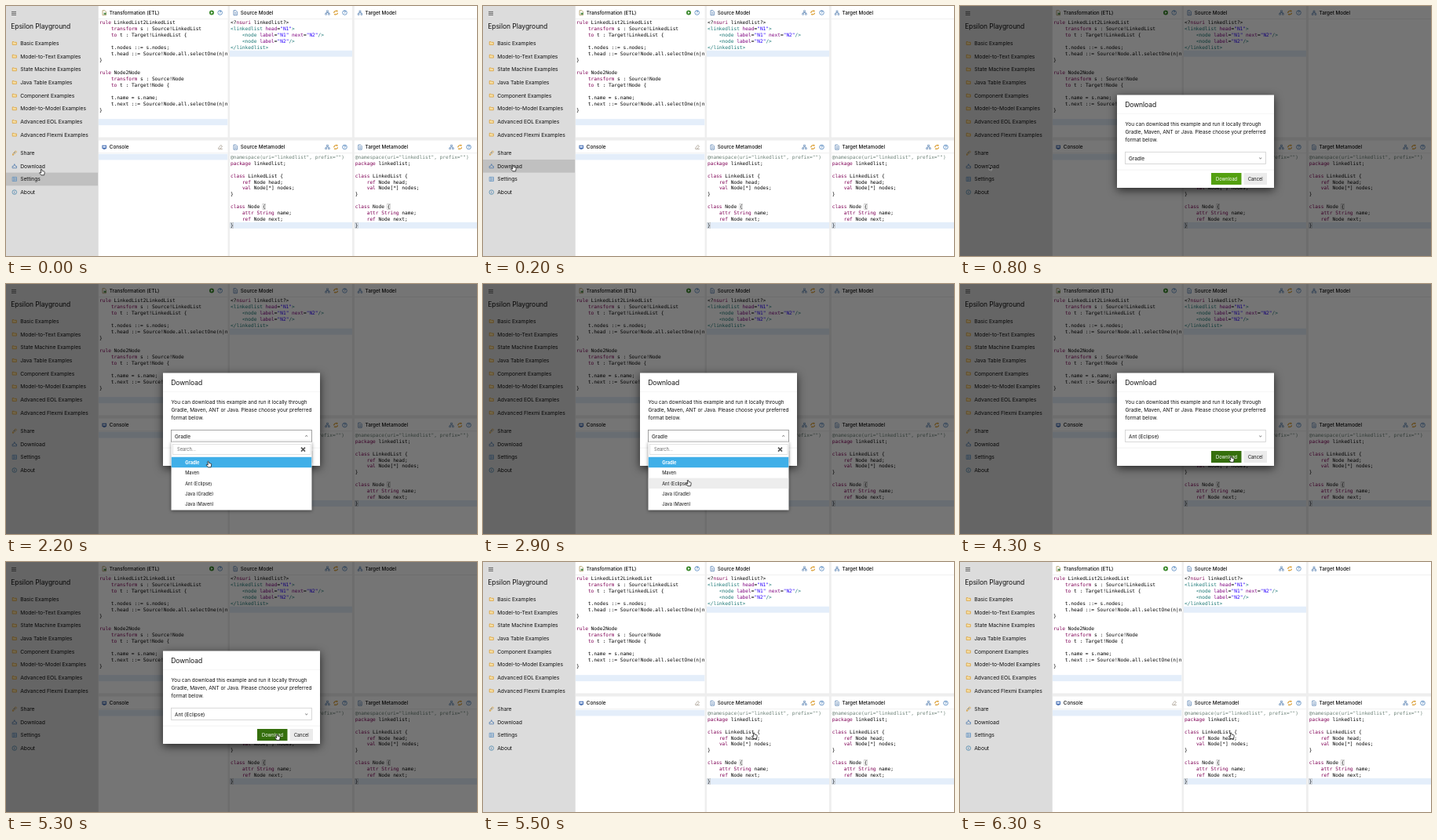
Recreate the animation shown at these times as an HTML page. Size 600 by 319 pixels, loop 6400 ms.

```html
<!DOCTYPE html>
<html lang="en">
<head>
<meta charset="utf-8">
<title>Playground download</title>
<style>
  html, body { margin: 0; width: 100%; height: 100%; overflow: hidden; background: #dcdcdc; }
  svg { display: block; width: 100%; height: 100%; }
  text { font: 6.5px Inter, sans-serif; letter-spacing: -.04px; fill: #111; white-space: pre; }
  .code { font: 6.18px "DejaVu Sans Mono", monospace; letter-spacing: 0; fill: #000; }
  .title { font-size: 8.5px; }
  .item { font-size: 6.75px; }
  .head { font-size: 6.35px; font-weight: 500; }
  .small { font-size: 5.7px; letter-spacing: 0; }
  .key { fill: #7f0055; } .str { fill: #2a00ff; } .tag { fill: #197674; }
  .attr { fill: #7f007f; } .note { fill: #6b8076; }
  .line { fill: none; stroke-width: .7; }
</style>
</head>
<body>
<svg id="stage" viewBox="0 0 600 319"></svg>
<script>
const BLUE = '#3f6fa8', GOLD = '#d99a2b', PITCH = 7.95, CHAR = 3.72;

const rect = (x, y, w, h, fill, more = '') =>
  `<rect x="${x}" y="${y}" width="${w}" height="${h}" fill="${fill}" ${more}/>`;
const text = (x, y, s, cls = '', more = '') => `<text x="${x}" y="${y}" class="${cls}" ${more}>${s}</text>`;
const at = (x, y, body) => `<g transform="translate(${x} ${y})">${body}</g>`;
const stroke = (d, color, more = '') => `<path class="line" d="${d}" stroke="${color}" ${more}/>`;

// Icons are centred on 0,0
const icons = {
  folder: stroke('M-2.6-1.9h1.9l.7.7h2.6v3.1h-5.2z', GOLD, 'style="fill:#f6dfa4"'),
  pen: stroke('M-2.5 2.5l.8-2.3L1.5-2.8 2.8-1.5-.4 1.7zM-1 2.6h-1.5', GOLD) + stroke('M-1 .6L1-1.4', BLUE),
  download: stroke('M-2.7 2.5v-2.3h1.5L0-2.6 1.2.2h1.5v2.3z', BLUE),
  settings: stroke('M-2.7-2.6h5.4v5.2h-5.4zM-.9-2.6v5.2M-.9-.8h3.6M-.9 1h3.6', '#5b8fc0'),
  about: '<circle class="line" r="2.8" stroke="#3b7fa8"/>' + stroke('M0-.4v2M0-1.7v.7', BLUE),
  help: '<circle class="line" r="2.8" stroke="#3672b4"/>' +
    text(0, 1.75, '?', '', 'text-anchor="middle" style="font-size:4.8px;font-weight:600;fill:#3672b4"'),
  run: '<circle r="3" fill="#3c8a2e"/><path d="M-.9-1.6L1.7 0-.9 1.6z" fill="#fff"/>',
  tree: stroke('M-1-2.7h2v1.7h-2zM-2.8 1h1.8v1.7h-1.8zM1 1h1.8v1.7H1zM0-1V0M-1.9 1V0h3.8v1', BLUE, 'style="stroke-width:.55"'),
  swap: stroke('M-2.7.6V-.5L-1-2.2h2M1.9.2V1L.6 2.3h-2', GOLD, 'style="stroke-width:1.1"') +
    '<path d="M.5-3.4l2 1.3-2 1.4zM-1 .9v2.6l-1.9-1.2z" fill="#d99a2b"/>',
  file: stroke('M-2.2-3h2.9l1.5 1.5V3h-4.4zM-.9-.5H1M-.9 1.2H1', BLUE),
  rule: stroke('M-2.2-3h2.9l1.5 1.5V3h-4.4z', '#a18a4a') + rect(-.6, 0, 3, 2.2, '#4c8b4a'),
  console: rect(-2.8, -2.5, 5.6, 4.2, '#3d67ae') + rect(-1.9, -1.5, 3.8, 2, '#dfe9f8') + rect(-1.5, 2, 3, .8, '#3d67ae'),
  eraser: stroke('M-2.4 1.3L.7-2.5 2.5-1-.6 2.5h-1.6zM-.5 2.5h3.3', '#9a8d7d')
};
const icon = (name, x, y) => at(x, y, icons[name]);

const TOKEN = /("[^"]*")|(&lt;\/?\w+|(?<!\?)\/?&gt;)|(\w+(?==))|\b(rule|transform|to|package|class|ref|val|attr|String|nsuri)\b/g;
function paint(line) {
  if (line[0] === '@') return `<tspan class="note">${line}</tspan>`;
  return line.replace(/</g, '&lt;').replace(/>/g, '&gt;').replace(TOKEN, (m, str, tag, attr) =>
    `<tspan class="${str ? 'str' : tag ? 'tag' : attr ? 'attr' : 'key'}">${m}</tspan>`);
}

// One editor pane; `active` is the index of the highlighted line
function pane(x, y, w, h, title, mark, tools, code = '', active = -1) {
  const top = y + 17;
  const rows = code.split('\n').map((s, i) => text(1, 6.2 + i * PITCH, paint(s), 'code')).join('');
  const band = active < 0 ? '' : rect(0, active * PITCH, w, PITCH, '#e4eefa');
  return rect(x, y, w, h, '#fff') + rect(x, y + 16, w, .6, '#e6e6e6') +
    icon(mark, x + 7.2, y + 8.7) + text(x + 13.8, y + 10.9, title, 'head') +
    tools.map(([n, tx]) => icon(n, tx, y + 8.5)).join('') +
    `<svg x="${x}" y="${top}" width="${w}" height="${h - 17}">${band}${rows}</svg>`;
}

const etl = `rule LinkedList2LinkedList
    transform s : Source!LinkedList
    to t : Target!LinkedList {

    t.nodes ::= s.nodes;
    t.head ::= Source!Node.all.selectOne(n|n.name
}

rule Node2Node
    transform s : Source!Node
    to t : Target!Node {

    t.name = s.name;
    t.next ::= Source!Node.all.selectOne(n|n.name
}`;
const xml = `<?nsuri linkedlist?>
<linkedlist head="N1">
    <node label="N1" next="N2"/>
    <node label="N2"/>
</linkedlist>`;
const meta = `@namespace(uri="linkedlist", prefix="")
package linkedlist;

class LinkedList {
    ref Node head;
    val Node[*] nodes;
}

class Node {
    attr String name;
    ref Node next;
}`;

const tools = x => [['tree', x], ['swap', x + 11], ['help', x + 22]];
const bracket = (x, line, col) =>
  rect(x + 1 + col * CHAR, 188.8 + line * PITCH, CHAR, PITCH - .8, 'none', 'stroke="#b8b8b8" stroke-width=".6"');
const brackets = x => bracket(x, 8, 11) + bracket(x, 11, 0);

const menu = ['Basic', 'Model-to-Text', 'State Machine', 'Java Table', 'Component', 'Model-to-Model',
  'Advanced EOL', 'Advanced Flexmi'].map(s => ['folder', s + ' Examples'])
  .concat([['pen', 'Share'], ['download', 'Download'], ['settings', 'Settings'], ['about', 'About']]);
const rowY = i => 47.5 + i * 16.67 + (i > 7 ? 6.7 : 0);

const page = rect(0, 0, 117.5, 319, '#dcdcdc') + rect(117.5, 0, 482.5, 319, '#eee') +
  rect(0, 0, 117, 16.7, '#c0c0c0', 'id="hover"') +
  stroke('M7 7.4h6M7 9.4h6M7 11.4h6', '#333') +
  text(6.2, 29.4, 'Epsilon Playground', 'title') +
  menu.map(([n, s], i) => icon(n, 10.8, rowY(i)) + text(18.2, rowY(i) + 2.4, s, 'item')).join('') +
  pane(118, 0, 164.5, 167.5, 'Transformation (ETL)', 'rule', [['run', 262], ['help', 272.7]], etl, 16) +
  pane(285, 0, 156, 167.5, 'Source Model', 'file', tools(409.5), xml, 5) +
  pane(443.8, 0, 156.2, 167.5, 'Target Model', 'tree', []) +
  pane(118, 171.5, 164.5, 147.5, 'Console', 'console', [['eraser', 273]], '', 0) +
  pane(285, 171.5, 156, 147.5, 'Source Metamodel', 'file', tools(409.5), meta, 11) +
  pane(443.8, 171.5, 156.2, 147.5, 'Target Metamodel', 'file', tools(567.5), meta, 11) +
  brackets(285) + brackets(443.8);

const options = ['Gradle', 'Maven', 'Ant (Eclipse)', 'Java (Gradle)', 'Java (Maven)'];
const optionY = i => 220.8 + i * 13.4;

const dialog = rect(0, 0, 600, 319, '#000', 'opacity=".54"') +
  rect(200, 113.5, 200, 118.5, '#fff', 'style="filter:drop-shadow(0 3px 6px #000a)"') +
  text(210.2, 129, 'Download', 'title') +
  rect(200, 137.5, 200, .5, '#ececec') + rect(200, 208.8, 200, .5, '#e4e4e4') +
  ['You can download this example and run it locally through',
    'Gradle, Maven, ANT or Java. Please choose your preferred',
    'format below.'].map((s, i) => text(210.5, 153.4 + i * 10, s)).join('') +
  rect(210.5, 186.3, 179, 15.2, '#fff', 'stroke="#cfcfcf" stroke-width=".8" id="box"') +
  text(215, 196.5, 'Gradle', '', 'id="choice"') +
  stroke('', '#333', 'id="caret"') +
  rect(320, 213, 38.5, 15, '#54a010', 'id="button"') +
  text(339.6, 222.6, 'Download', 'small', 'text-anchor="middle" style="fill:#fff"') +
  rect(361.5, 213, 29.5, 15, '#ebebeb') +
  text(376.3, 222.6, 'Cancel', 'small', 'text-anchor="middle"');

const list = rect(210.5, 201.5, 179, 87, '#fff', 'style="filter:drop-shadow(0 1px 2px #0007)"') +
  rect(212.5, 204.6, 175.5, 13, '#fff', 'stroke="#d0d0d0" stroke-width=".6"') +
  text(218, 213.2, 'Search...', 'small', 'style="fill:#666"') +
  stroke('M376 208.6l5 5M381 208.6l-5 5', '#555', 'style="stroke-width:1.6"') +
  rect(210.8, 0, 178.4, 13.4, '#ededed', 'id="option"') +
  rect(210.8, optionY(0), 178.4, 13.4, '#40afe8') +
  options.map((s, i) => text(228.2, optionY(i) + 8.9, s, 'small',
    i ? '' : 'style="fill:#fff;font-weight:700"')).join('');

const hand = '<path id="hand" d="M-1.7-3.4q.8-.8 1.4 0l.5 2 2.3.5q.9.3.7 1.2l-.6 3.5h-3.7l-2.3-2.7q.1-1.1 1.2-.6l1 .6z" ' +
  'fill="#fff" stroke="#111" stroke-width=".75"/>';
const arrow = '<path id="arrow" d="M-1.8-3v5.4l1.3-1.2.8 1.9.9-.4-.8-1.8h1.7z" fill="#000" stroke="#ddd" stroke-width=".5"/>';

const $ = id => document.getElementById(id);
$('stage').innerHTML = page +
  `<g id="dialog">${dialog}<g id="list">${list}</g></g><g id="cursor">${hand}${arrow}</g>`;

// Cursor stops: time, x, y
const path = [[0, 46, 212], [50, 46, 212], [200, 39, 207], [850, 39, 207], [1300, 258, 195], [1600, 258, 195],
  [2100, 258.5, 230], [2250, 258.5, 230], [2800, 262, 254], [3000, 262, 254], [3400, 262, 246],
  [3600, 262, 246], [4300, 346, 223.5], [5300, 346, 223.5], [5500, 346, 221.5], [6400, 346, 221.5]];

function cursorAt(t) {
  const i = path.findIndex(p => p[0] > t);
  const [t0, x0, y0] = path[i - 1], [t1, x1, y1] = path[i];
  const u = (t - t0) / (t1 - t0), e = u * u * (3 - 2 * u);
  return [x0 + (x1 - x0) * e, y0 + (y1 - y0) * e];
}

const set = (id, name, value) => $(id).setAttribute(name, value);
const show = (id, on) => set(id, 'visibility', on ? 'inherit' : 'hidden');

function draw(now) {
  const t = now % 6400;
  const [x, y] = cursorAt(t);
  const open = t >= 1600 && t < 3000;
  const clickable = t < 800 || open || t >= 4300;
  const over = Math.floor((y - 4 - optionY(0)) / 13.4);
  set('cursor', 'transform', `translate(${x} ${y})`);
  show('hand', clickable);
  show('arrow', !clickable);
  set('hover', 'y', rowY(t < 100 ? 10 : 9) - 8.3);
  show('hover', t < 800);
  set('dialog', 'visibility', t >= 800 && t < 5500 ? 'visible' : 'hidden');
  show('list', open);
  show('option', open && over > 0);
  set('option', 'y', optionY(Math.max(over, 0)));
  set('box', 'stroke', open ? '#8a8a8a' : '#cfcfcf');
  set('caret', 'd', open ? 'M381.2 194.6l1.5-1.3 1.5 1.3' : 'M381.2 193.6l1.5 1.3 1.5-1.3');
  set('button', 'fill', t >= 4300 ? '#356f0d' : '#54a010');
  $('choice').textContent = options[t < 3000 ? 0 : 2];
  requestAnimationFrame(draw);
}
requestAnimationFrame(draw);
</script>
</body>
</html>
```
